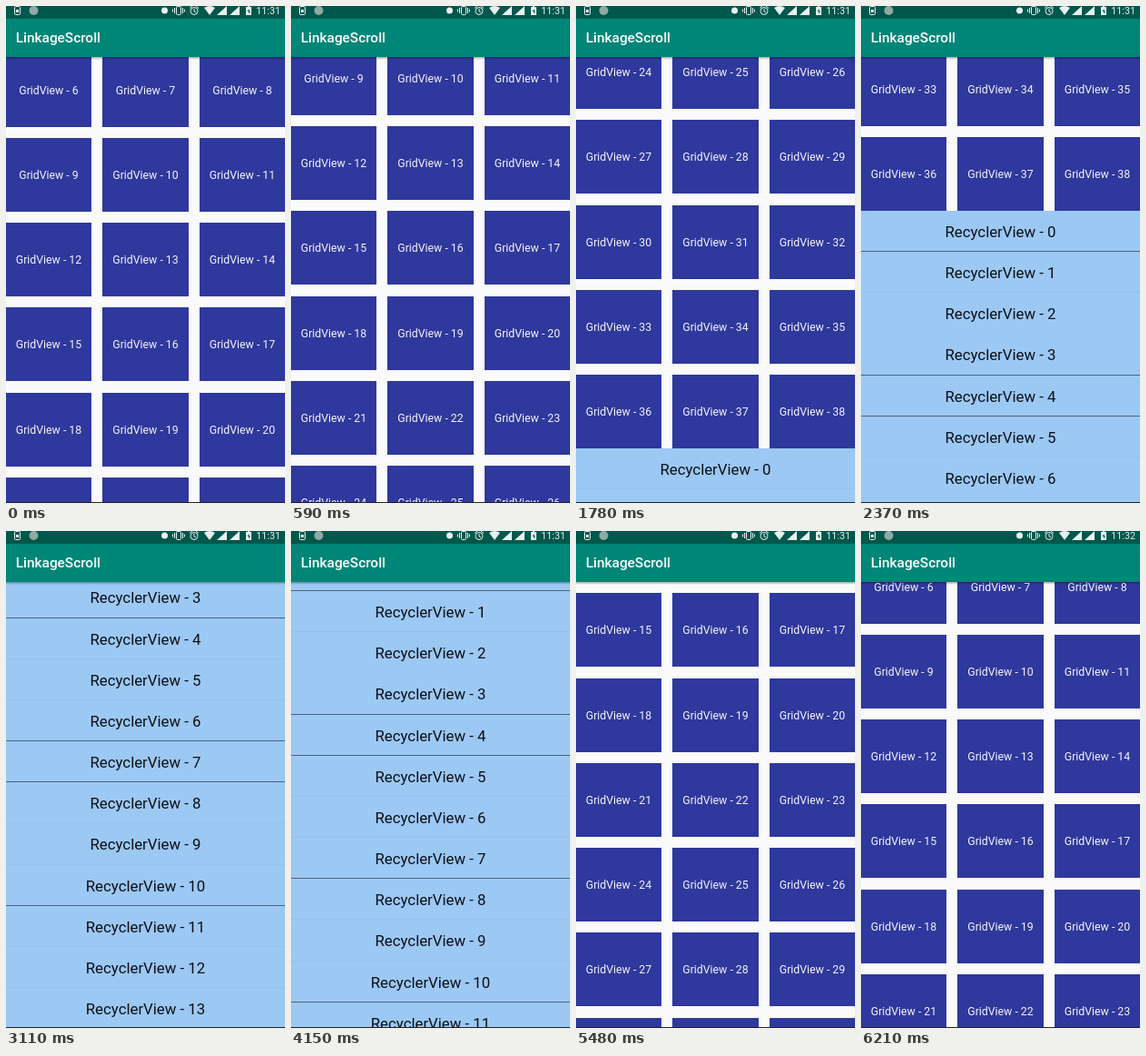
An HTML page for the animation above (7140 ms loop, 307 by 546 pixels).

```html
<!DOCTYPE html>
<html lang="en">
<head>
<meta charset="utf-8">
<title>LinkageScroll</title>
<style>
html, body { margin: 0; width: 307px; height: 546px; overflow: hidden; background: #fafafa; }
body { position: relative; font-family: Roboto, "Noto Sans", sans-serif; }
#view { position: absolute; top: 56px; left: 0; width: 307px; height: 490px; overflow: hidden; }
#scroll { position: absolute; top: -56px; left: 0; width: 307px; }
.cell, .item { position: absolute; text-align: center; white-space: nowrap; }
.cell { height: 81px; line-height: 83px; background: #2f389c; color: #f4f4fb; font-size: 12.3px; }
.item { left: 0; width: 307px; height: 45.3px; line-height: 47px; background: #9cc8f4; color: #0c1016; font-size: 16.8px; }
.item i { position: absolute; left: 0; bottom: 0; width: 100%; height: 1px; background: #000; }
#view::before { content: ""; position: absolute; z-index: 1; width: 100%; height: 3px; background: linear-gradient(#0005, #0000); }
#edge { position: absolute; top: 545px; width: 307px; height: 1px; background: #222; }
header { position: absolute; top: 0; left: 0; width: 307px; height: 56px; background: linear-gradient(#00574b 14px, #008677 14px); color: #fff; }
h1 { position: absolute; left: 10.7px; top: 25px; margin: 0; font-size: 15.4px; line-height: 21px; font-weight: 500; }
#clock { position: absolute; left: 275.3px; top: -1px; font-size: 10.7px; line-height: 14px; color: #e8f1ef; }
svg { position: absolute; top: 0; left: 0; }
</style>
</head>
<body>
<div id="view"><div id="scroll"></div></div>
<div id="edge"></div>
<header>
  <svg width="307" height="14" fill="#e8f1ef">
    <g fill="none" stroke="#e8f1ef">
      <rect x="9.5" y=".5" width="6" height="9" rx="1"/>
      <rect x="187.5" y=".5" width="5" height="9" rx="1"/>
      <path d="M185.5 2v6M194.5 2v6M183.5 3.5v3M196.5 3.5v3M202 2.5l3-2.5M212 2.5L209 0M207 3v3l2 1"/>
      <circle cx="207" cy="5.5" r="4"/>
    </g>
    <path d="M11 4h3v3h-3zM218 2q6-4 12 0l-6 8zM232 10l11-10v10zM246 10l11-10v10zM264 1h2V0h2v1h2v9h-6z"/>
    <path d="M267.5 3l-2 3h1.500v2.500l2-3h-1.500z" fill="#00574b"/>
    <circle cx="30.5" cy="5" r="5" fill="#8eaaa5"/>
    <circle cx="174.5" cy="5" r="3.5"/>
  </svg>
  <span id="clock">11:31</span>
  <h1>LinkageScroll</h1>
</header>
<script>
const LOOP = 7140, START = 434, STEP = 148.1, STEPS = 40;
const ROW = 93.25, ITEM = 45.15, LIST_TOP = 1200;
const scroll = document.getElementById('scroll');
const clock = document.getElementById('clock');

// step, scroll offset, speed per step
const path = [
  [-1, 93.5, 45], [5, 447.5, 59], [9, 673, 60], [18, 1243.6, 52],
  [21, 1340, 0], [25, 1137.7, -78], [34, 356.75, -67], [39, 124.5, -25]
];

function add(className, text, style) {
  const el = document.createElement('div');
  el.className = className;
  el.textContent = text;
  Object.assign(el.style, style);
  return scroll.appendChild(el);
}

for (let i = 0; i < 39; i++) {
  const col = i % 3;
  add('cell', 'GridView - ' + i, {
    left: [0, 106, 213][col] + 'px',
    width: [94, 95, 94][col] + 'px',
    top: Math.floor(i / 3) * ROW + 'px'
  });
}

const lines = Array.from({ length: 30 }, (_, i) =>
  add('item', 'RecyclerView - ' + i, { top: LIST_TOP + i * ITEM + 'px' })
    .appendChild(document.createElement('i')));

// Cubic Hermite curve through the path points
function offsetAt(step) {
  const k = Math.max(1, path.findIndex(p => p[0] >= step));
  const [a, y0, v0] = path[k - 1], [b, y1, v1] = path[k];
  const d = b - a, u = (step - a) / d, w = 1 - u;
  return w * w * ((1 + 2 * u) * y0 + u * d * v0) + u * u * ((1 + 2 * w) * y1 - w * d * v1);
}

const fract = x => x - Math.floor(x);

function draw(now) {
  const t = now % LOOP;
  const step = Math.max(-1, Math.min(STEPS - 1, Math.floor((t - START) / STEP)));
  const offset = offsetAt(step);
  scroll.style.transform = `translateY(${Math.floor(-offset - 41)}px)`;
  // Thin dividers fade in and out with their sub-pixel position
  lines.forEach((line, i) => {
    line.style.opacity = fract(0.3 * i - offset - 0.2) < 0.35 ? 0.5 : 0.04;
  });
  clock.textContent = step < 36 ? '11:31' : '11:32';
}

const begin = performance.now();
function tick() {
  draw(performance.now() - begin);
  requestAnimationFrame(tick);
}
tick();
</script>
</body>
</html>
```
